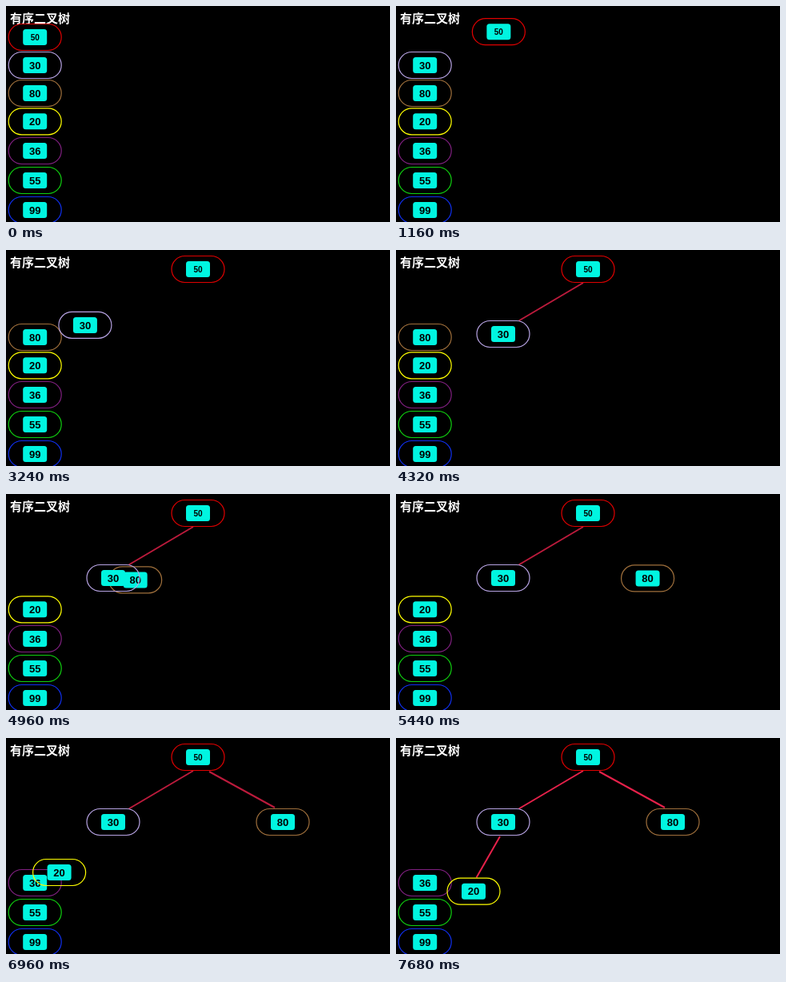
These frames come from a looping animation (480 by 270 pixels, 8000 ms). An HTML page:

```html
<!DOCTYPE html>
<html lang="zh">
<head>
<meta charset="utf-8">
<title>有序二叉树</title>
<style>
html, body { margin: 0; width: 100%; height: 100%; overflow: hidden; background: #000; }
svg { display: block; width: 480px; height: 270px; }
.title { font: 600 15px "Noto Sans CJK SC", "Noto Sans CJK", sans-serif; fill: #fff; }
.node text { font-family: "Liberation Sans", Arial, sans-serif; font-weight: bold; text-anchor: middle; }
.pill { fill: none; stroke-width: 1.2; }
.box { fill: #00f5e1; }
.edge { stroke: #e6214a; stroke-width: 2; }
</style>
</head>
<body>
<svg viewBox="0 0 480 270">
  <text class="title" x="5" y="20.5">有序二叉树</text>
  <g id="edges"></g>
  <g id="nodes"></g>
</svg>
<script>
const LOOP = 8000, TICK = 40, FIRST = 480, PERIOD = 1920, MOVE = 1440, LEFT = 36.2;

// value, colour, start y, final position, edge from the parent
const nodes = [
  { n: 50, color: '#e00000', y: 39, to: [240, 24] },
  { n: 30, color: '#b7a3e3', y: 74, to: [134, 105], edge: [234, 41, 153.5, 88.5] },
  { n: 80, color: '#a0703c', y: 109, to: [346, 105], edge: [254, 42, 336, 87] },
  { n: 20, color: '#ffff00', y: 144.3, to: [97, 191.7], edge: [130, 123, 100.5, 174.5] },
  { n: 36, color: '#802080', y: 181 },
  { n: 55, color: '#10d010', y: 218 },
  { n: 99, color: '#1030f0', y: 255 }
];

function add(parent, tag, attrs) {
  const el = document.createElementNS('http://www.w3.org/2000/svg', tag);
  for (const k in attrs) el.setAttribute(k, attrs[k]);
  parent.append(el);
  return el;
}

const edgeLayer = document.getElementById('edges');
const nodeLayer = document.getElementById('nodes');

// earlier nodes lie on top
for (const d of [...nodes].reverse()) {
  d.g = add(nodeLayer, 'g', { class: 'node' });
  add(d.g, 'rect', { class: 'pill', x: -33, y: -16.5, width: 66, height: 33, rx: 16.5, stroke: d.color });
  add(d.g, 'rect', { class: 'box', x: -15, y: -10, width: 30, height: 20, rx: 3.5 });
  const size = d.n === 50 ? 10 : 13;
  add(d.g, 'text', { y: size * 0.36, 'font-size': size }).textContent = d.n;
  if (d.edge) {
    const [x1, y1, x2, y2] = d.edge;
    d.line = add(edgeLayer, 'line', { class: 'edge', x1, y1, x2, y2 });
  }
}

// cubic-bezier(.42, 0, .58, 1), solved by bisection
function ease(x) {
  if (x <= 0) return 0;
  if (x >= 1) return 1;
  let lo = 0, hi = 1, s;
  for (let i = 0; i < 24; i++) {
    s = (lo + hi) / 2;
    const bx = 1.26 * s * (1 - s) ** 2 + 1.74 * s * s * (1 - s) + s ** 3;
    if (bx < x) lo = s; else hi = s;
  }
  return s * s * (3 - 2 * s);
}

function draw(time) {
  const t = Math.floor(time % LOOP / TICK) * TICK;
  const phase = t - FIRST;
  const moving = phase >= 0 && phase < 4 * PERIOD - TICK && phase % PERIOD < MOVE;
  // edges are dimmer while a node travels
  edgeLayer.setAttribute('opacity', moving ? 0.82 : 1);
  nodes.forEach((d, i) => {
    const u = (phase - i * PERIOD) / MOVE;
    const [x, y] = d.to || [LEFT, d.y];
    const p = ease(u);
    d.g.setAttribute('transform', `translate(${LEFT + (x - LEFT) * p} ${d.y + (y - d.y) * p})`);
    if (d.line) d.line.setAttribute('visibility', u >= 1 ? 'visible' : 'hidden');
  });
}

const start = performance.now();
function loop() {
  draw(performance.now() - start);
  requestAnimationFrame(loop);
}
loop();
</script>
</body>
</html>
```
